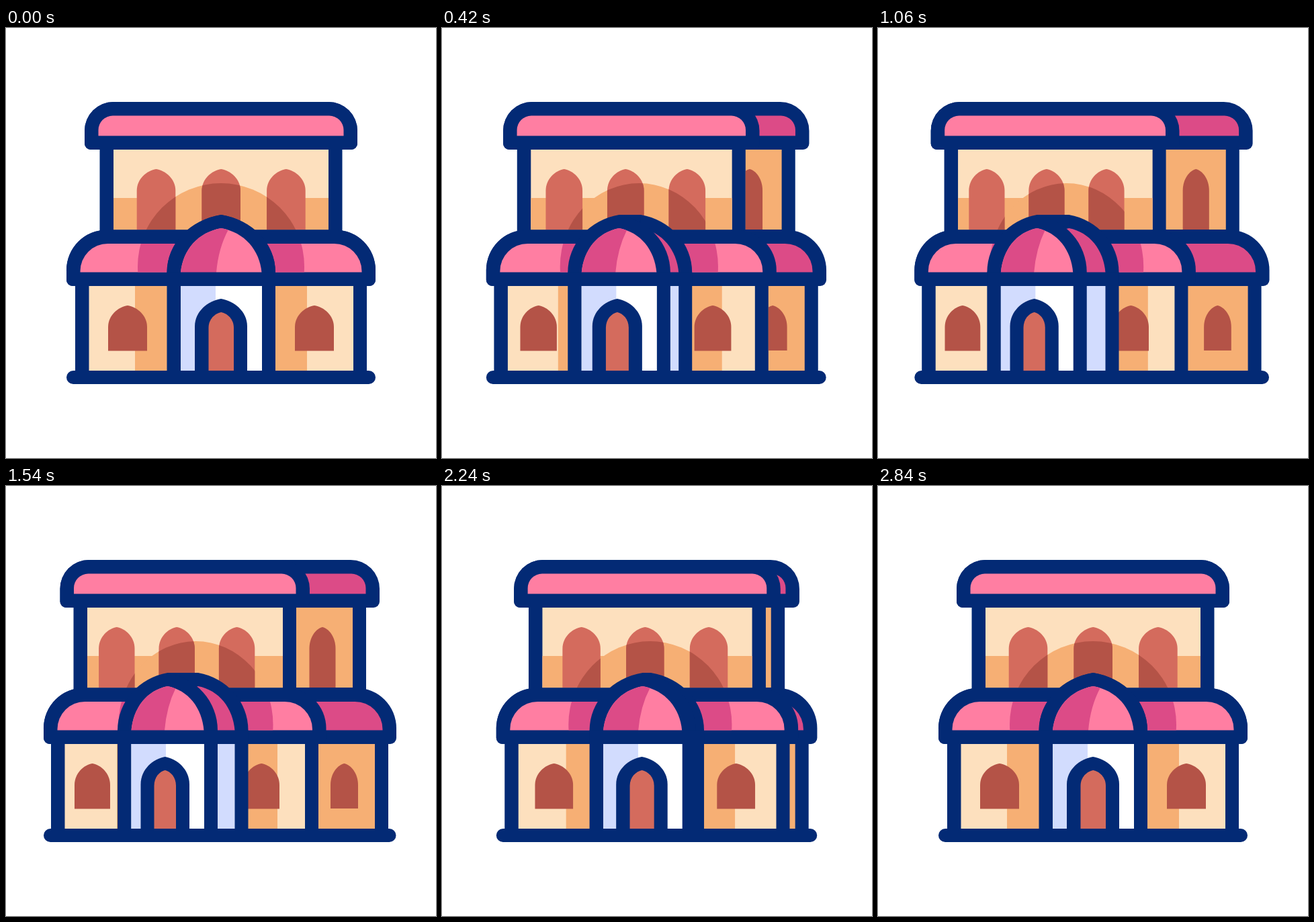
An HTML page with a canvas for the animation above (3600 ms loop, 640x640 px).

```html
<!DOCTYPE html>
<html lang="en">
<head>
<meta charset="utf-8">
<title>Turning building</title>
<style>
  html, body { margin: 0; width: 100%; height: 100%; overflow: hidden; background: #fff; }
  canvas { display: block; width: 640px; height: 640px; }
</style>
</head>
<body>
<canvas id="stage" width="640" height="640"></canvas>
<script>
const ctx = document.getElementById('stage').getContext('2d');
const LOOP = 3600;
const NAVY = '#032a75', PINK = '#ff7ea2', ROSE = '#dc4b87', CREAM = '#fde0be',
      ORANGE = '#f6af74', RED = '#d46b5d', BRICK = '#b45347', ICE = '#d2dcfe', WHITE = '#fff';

// Turn of the building over time: [ms, amount]
const turn = [
  [0, 0], [60, .073], [114, .179], [173, .309], [242, .451], [330, .6], [420, .711],
  [540, .836], [700, .94], [900, 1.015], [1080, 1.052], [1250, 1.065],
  [1400, 1.047], [1540, 1], [1640, .956], [1780, .871], [1920, .753], [2040, .595],
  [2160, .405], [2240, .271], [2320, .172], [2420, .093], [2550, .037], [2700, .01], [2840, 0]
];
const rise = i => (turn[i + 1][1] - turn[i][1]) / (turn[i + 1][0] - turn[i][0]);
const slopes = turn.map((_, i) => {
  if (!i || i === turn.length - 1) return i ? 0 : rise(0);
  const a = rise(i - 1), b = rise(i);
  return a * b > 0 ? 2 * a * b / (a + b) : 0;
});

function turnAt(t) {
  const i = turn.findIndex(k => k[0] > t) - 1;
  if (i < 0) return 0;
  const [t0, a] = turn[i], [t1, b] = turn[i + 1], d = t1 - t0, u = (t - t0) / d, v = 1 - u;
  return a * v * v * (1 + 2 * u) + b * u * u * (3 - 2 * u)
       + d * u * v * (slopes[i] * v - slopes[i + 1] * u);
}

let p = 0;
const mix = (a, b) => a + (b - a) * p;

function fill(path, color) {
  ctx.fillStyle = color;
  ctx.fill(path);
}

function box(l, r, top, bottom, radii = 0) {
  const path = new Path2D();
  if (r > l) path.roundRect(l, top, r - l, bottom - top, radii);
  return path;
}

function clipped(path, draw) {
  ctx.save();
  ctx.clip(path);
  draw();
  ctx.restore();
}

function arch(l, r, top, bottom, h = 32) {
  const c = (l + r) / 2, w = (r - l) / 2, s = top + h, path = new Path2D();
  path.moveTo(l, bottom);
  path.lineTo(l, s);
  path.bezierCurveTo(l, s - .55 * h, c - .48 * w, top + .07 * h, c, top);
  path.bezierCurveTo(c + .48 * w, top + .07 * h, r, s - .55 * h, r, s);
  path.lineTo(r, bottom);
  path.closePath();
  return path;
}

// Dome outline with apex at top and feet at y 364
function dome(l, r, top, bend) {
  const c = (l + r) / 2, w = (r - l) / 2, h = 364 - top, path = new Path2D();
  path.moveTo(l, 364);
  path.bezierCurveTo(l + bend * w, 364 - .51 * h, c - .57 * w, top + .09 * h, c, top);
  path.bezierCurveTo(c + .57 * w, top + .09 * h, r - bend * w, 364 - .51 * h, r, 364);
  path.closePath();
  return path;
}

function shadow() {
  const path = new Path2D();
  path.ellipse(mix(320, 282.5), 355, mix(124, 115), 124, 0, 0, 7);
  return path;
}

function roof(l, front, far, top, bottom, R, r) {
  const low = bottom - 20.5, outer = [R, R, 9, 9], inner = [r, r, 0, 0];
  fill(box(l, far, top, bottom, outer), NAVY);
  fill(box(l + 20.5, far - 20.5, top + 20.5, low, inner), ROSE);
  fill(box(l, front, top, bottom, outer), NAVY);
  const face = box(l + 20.5, front - 20.5, top + 20.5, low, inner);
  fill(face, PINK);
  return face;
}

function upperFloor() {
  const front = mix(500.5, 432);
  fill(box(mix(139.5, 100.5), mix(500.5, 536), 170, 310), NAVY);

  const side = box(front, mix(480, 516), 181, 300);
  fill(side, ORANGE);
  clipped(side, () => fill(arch(mix(408, 451.5), mix(444, 490.5), 210, 300), BRICK));

  const l = mix(160, 121), r = mix(480, 412), wall = box(l, r, 181, 300.5);
  fill(wall, CREAM);
  fill(box(l, r, 253, 300.5), ORANGE);
  clipped(wall, () => {
    fill(shadow(), ORANGE);
    for (let i = -1; i <= 1; i++) {
      const c = mix(320.2, 254.2) + i * mix(96.7, 89.4), w = mix(28.8, 26.7);
      const pane = arch(c - w, c + w, 210, 301);
      fill(pane, RED);
      clipped(pane, () => fill(shadow(), BRICK));
    }
  });
  roof(mix(117, 80.5), mix(523, 452), mix(523, 556), 110, 181, 43, 21.5);
}

function lowerFloor() {
  fill(box(mix(103, 67), mix(537, 569), 375, 520), NAVY);

  const side = box(mix(537, 465), mix(517, 549), 384, 510);
  fill(side, ORANGE);
  clipped(side, () => fill(arch(mix(440, 483), mix(488, 524), 413, 480), BRICK));

  const wall = box(mix(123.5, 87.5), mix(517, 445), 384, 510);
  fill(wall, CREAM);
  clipped(wall, () => fill(box(mix(192, 165), mix(448, 404), 384, 510), ORANGE));
  fill(arch(mix(152, 102), mix(210, 155), 413, 480.5), BRICK);
  fill(arch(mix(430, 353.5), mix(488, 407), 413, 480.5), BRICK);

  const face = roof(mix(90, 56), mix(550, 476.5), mix(550, 581), 300.5, 384, 60, 41);
  clipped(face, () => fill(shadow(), ROSE));
}

function entrance() {
  const l = mix(239.5, 166), r = mix(401, 315), far = mix(401, 360.5);
  const c = (l + r) / 2, back = far - (r - l);

  // Rear dome and the flat ridge joining it to the front one
  fill(dome(back, far, 278, 0), NAVY);
  fill(box(c, (back + far) / 2, 278, 364), NAVY);
  fill(dome(back + 20, far - 20, 298, .05), ROSE);
  fill(dome(l, r, 278, 0), NAVY);

  const face = dome(l + 20.5, r - 20.5, 298, .05);
  fill(face, PINK);
  clipped(face, () => {
    const top = mix(331, 253), foot = mix(313, 236), shade = new Path2D();
    shade.moveTo(l, 290);
    shade.lineTo(top + 4, 290);
    shade.lineTo(top, 300);
    shade.quadraticCurveTo(foot + 3, 328, foot, 364);
    shade.lineTo(l, 364);
    fill(shade, ROSE);
  });

  fill(box(l, far, 363.5, 520), NAVY);
  fill(box(r, mix(381, 340.5), 384, 510), ICE);
  fill(box(mix(260, 186.5), mix(381, 295), 384, 510), WHITE);
  fill(box(mix(260, 186.5), mix(312, 238), 384, 510), ICE);
  fill(arch(mix(281, 200.5), mix(359, 273), 403, 515, 41), NAVY);
  fill(arch(mix(301.5, 220.5), mix(339, 253), 423, 510, 23), RED);
}

function frame(now) {
  p = turnAt(now % LOOP);
  ctx.fillStyle = WHITE;
  ctx.fillRect(0, 0, 640, 640);
  upperFloor();
  lowerFloor();
  entrance();
  fill(box(mix(90, 56), mix(550, 580.5), 510, 530, 10), NAVY);
}

let start;
function tick(now) {
  start ??= now;
  frame(Math.max(0, now - start));
  requestAnimationFrame(tick);
}
frame(0);
requestAnimationFrame(tick);
</script>
</body>
</html>
```
